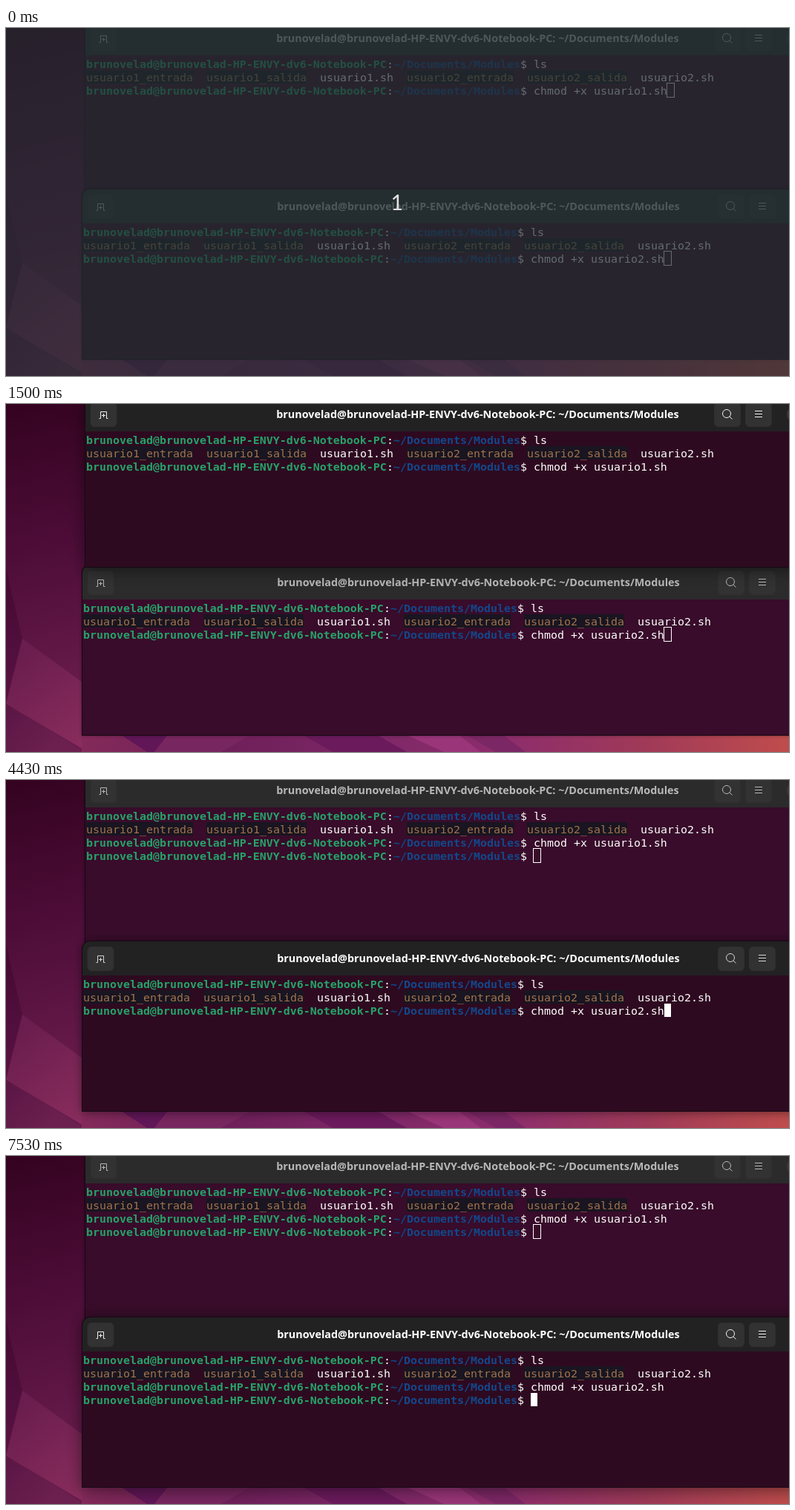
Write an HTML page with a canvas that moves like this. It is 1055 px wide and 470 px high and loops after 8 s.

```html
<!DOCTYPE html>
<html lang="es">
<head>
<meta charset="utf-8">
<title>Terminals</title>
<style>
html, body { margin: 0; width: 100%; height: 100%; overflow: hidden; background: #4d0d38; }
canvas { display: block; }
</style>
</head>
<body>
<canvas id="stage" width="1055" height="470"></canvas>
<script>
const g = document.getElementById('stage').getContext('2d');
const LOOP = 8000, CELL = 9, ROW = 18;
const HOST = 'brunovelad@brunovelad-HP-ENVY-dv6-Notebook-PC';
const DIR = '~/Documents/Modules';
const MONO = '14.95px "DejaVu Sans Mono", monospace';
const PROMPT = HOST.length + DIR.length + 3;

// Times at which each window gains and loses focus, starts to blink, and runs its command
const windows = [
  { x: 107, y: -9, mid: 635.5, search: 972, file: 'usuario1.sh', on: 900, off: 4330, blink: 900, key: 2930 },
  { x: 103, y: 218, mid: 636.5, search: 977, file: 'usuario2.sh', on: 4330, off: LOOP, blink: 4300, key: 5130 }
];

function blend(x0, y0, x1, y1, ...colors) {
  const fill = g.createLinearGradient(x0, y0, x1, y1);
  colors.forEach((c, i) => fill.addColorStop(i / (colors.length - 1), c));
  return fill;
}

function poly(fill, ...p) {
  g.fillStyle = fill;
  g.beginPath();
  for (let i = 0; i < p.length; i += 2) g.lineTo(p[i], p[i + 1]);
  g.fill();
}

function box(fill, x, y, w, h) {
  g.fillStyle = fill;
  g.fillRect(x, y, w, h);
}

function wallpaper() {
  box(blend(0, 0, 90, 370, '#340320', '#4c0c37', '#661a4a'), 0, 0, 110, 470);
  poly(blend(0, 222, 0, 405, '#440933', '#591343'), 0, 222, 22, 317, 0, 405);
  poly(blend(15, 340, 105, 460, '#6a1d4e', '#892d5d'), 22, 317, 110, 381, 110, 470, 0, 405);
  poly(blend(0, 405, 60, 470, '#5a1645', '#6c204f'), 0, 405, 107, 470, 0, 470);
  box(blend(102, 0, 1055, 0, '#842a5a', '#6e1f59', '#7d2767', '#8d2d6c', '#a03a58', '#c04d4d'), 102, 440, 953, 30);
  poly('#611657', 155, 447, 218, 447, 200, 470, 190, 470);
  poly('#78265f', 218, 447, 330, 447, 290, 470, 200, 470);
  poly('#6b1a5c', 400, 447, 500, 447, 540, 470, 440, 470);
  poly('#9a3579', 540, 447, 610, 447, 640, 470, 590, 470);
  poly('#7c2765', 620, 447, 670, 447, 700, 470, 660, 470);
}

function text(s, x, y, color, bold) {
  g.font = (bold ? 'bold ' : '') + MONO;
  g.fillStyle = color;
  g.fillText(s, x, y);
}

function prompt(x, y, command) {
  text(HOST, x, y, '#26a269', true);
  x += HOST.length * CELL;
  text(':', x, y, '#fff');
  text(DIR, x + CELL, y, '#12488b', true);
  x += (DIR.length + 1) * CELL;
  text('$ ' + command, x, y, '#fff');
}

function listing(x, y) {
  for (const user of ['usuario1', 'usuario2']) {
    for (const kind of ['_entrada', '_salida']) {
      const name = user + kind;
      box('#191521', x, y - 15, name.length * CELL, ROW);
      text(name, x, y, '#a2734c');
      x += (name.length + 2) * CELL;
    }
    text(user + '.sh', x, y, '#fff');
    x += 13 * CELL;
  }
}

function button(x, y, fade, path) {
  const light = 184 + 58 * fade;
  g.beginPath();
  g.roundRect(x - 17.5, y - 15.5, 35, 32, 5);
  g.fillStyle = '#323232';
  g.strokeStyle = '#2f2f2f';
  g.fill();
  g.stroke();
  g.save();
  g.translate(x, y);
  g.strokeStyle = `rgb(${light},${light},${light})`;
  g.stroke(new Path2D(path));
  g.restore();
}

// The hollow cursor surrounds its cell by one pixel
function cursor(x, y, focused) {
  if (focused) return box('#fff', x, y, CELL, ROW);
  g.strokeStyle = '#fff';
  g.strokeRect(x - .5, y - .5, CELL + 1, ROW + 1);
}

function drawWindow(w, t) {
  const { x, y } = w, h = 229;
  const focused = t >= w.on && t < w.off;
  const fade = focused ? Math.min(1, (t - w.on) / 200) : 0;
  const ran = t >= w.key + 40;
  const iconY = y + 23;

  g.save();
  g.shadowColor = `rgba(0,0,0,${.4 + .1 * fade})`;
  g.shadowBlur = 4 + 18 * fade;
  g.shadowOffsetY = 3 * fade;
  g.beginPath();
  g.roundRect(x - 1, y - 1, 1000, h + 2, [11, 0, 0, 0]);
  g.fillStyle = '#160813';
  g.fill();
  g.restore();

  box(focused ? '#2e0a20' : '#380c2a', x, y + 46, 1000, h - 46);
  g.beginPath();
  g.roundRect(x, y, 1000, 46, [10, 0, 0, 0]);
  g.fillStyle = focused ? '#222' : '#2b2b2b';
  g.fill();

  button(x + 24.5, iconY, fade, 'M-6 5.5h2v-9h8v9h2M-2.5 1.5h5M0-1v5');
  button(w.search, iconY, fade, 'M4.5-1A5.5 5.5 0 1 1-6.5-1A5.5 5.5 0 1 1 4.5-1M3 3L6.5 6.5');
  button(w.search + 42, iconY, fade, 'M-5-4.5h10M-5-.5h10M-5 3.5h10');
  g.beginPath();
  g.arc(w.search + 92, iconY, 12, 0, 7);
  g.fillStyle = '#393939';
  g.fill();

  g.font = 'bold 14.35px "Noto Sans", sans-serif';
  g.textAlign = 'center';
  g.fillStyle = focused ? '#fff' : '#b8b8b8';
  g.fillText(HOST + ': ' + DIR, w.mid, iconY + 5);
  g.textAlign = 'left';

  const left = x + 1, top = y + 48, base = top + 15;
  const command = 'chmod +x ' + w.file;
  prompt(left, base, 'ls');
  listing(left, base + ROW);
  prompt(left, base + 2 * ROW, command);
  if (ran) prompt(left, base + 3 * ROW, '');

  // Blinking restarts on a key press
  const since = t >= w.key ? w.key : w.blink;
  if (!focused || Math.floor((t - since) / 600) % 2 === 0) {
    const col = PROMPT + (ran ? 0 : command.length);
    cursor(left + col * CELL, top + (ran ? 3 : 2) * ROW, focused);
  }
}

function countdown() {
  box('rgba(34,46,49,.7)', 0, 0, 1055, 470);
  g.font = '29px Lato, sans-serif';
  g.textAlign = 'center';
  g.fillStyle = '#e2e2e2';
  g.fillText('1', 527, 246);
  g.textAlign = 'left';
}

function draw(now) {
  const t = now % LOOP;
  const [upper, lower] = windows;
  const order = t >= upper.on && t < upper.off ? [lower, upper] : [upper, lower];
  wallpaper();
  order.forEach(w => drawWindow(w, t));
  if (t < 30) countdown();
  requestAnimationFrame(draw);
}

draw(0);
</script>
</body>
</html>
```
